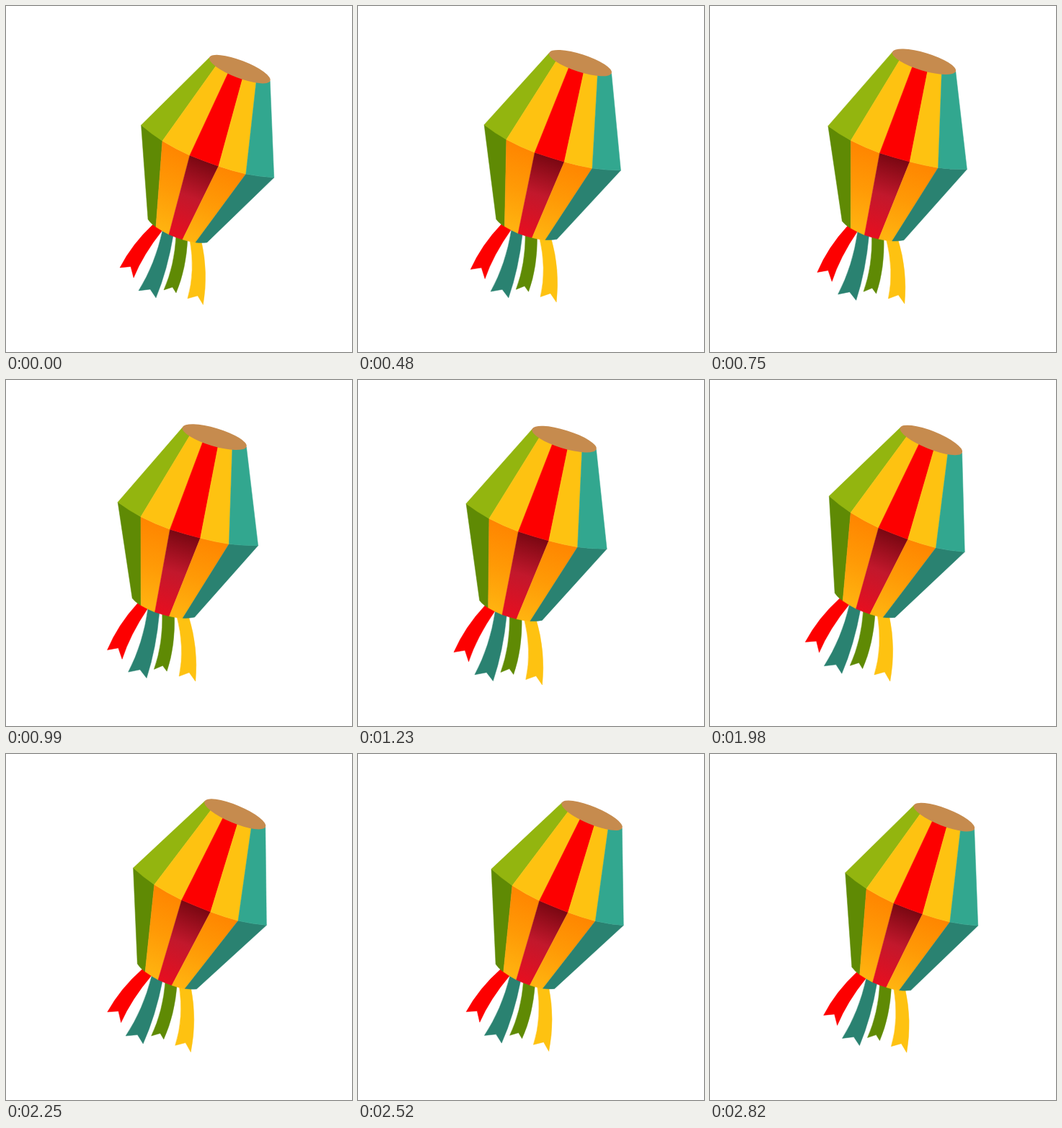
An HTML page without scripts for the animation above (2850 ms loop, 480 px wide and 480 px high).

```html
<!DOCTYPE html>
<html lang="en">
<head>
<meta charset="utf-8">
<title>Swinging paper lantern</title>
<style>
  html, body { margin: 0; width: 100%; height: 100%; overflow: hidden; background: #fff; }
  svg { display: block; width: 100%; height: 100%; }
  path { fill: var(--c); stroke: var(--c); stroke-width: .5; }

  /* Each part of the drift is a sine wave with its own phase */
  .bob, .swing { --sine: cubic-bezier(.364, 0, .636, 1); transform-origin: 0 0; }
  .bob { animation: bob 2850ms var(--sine) -2730ms infinite; }
  .swing {
    animation:
      drift 1425ms var(--sine) -47ms infinite alternate,
      tilt 1425ms var(--sine) -507ms infinite alternate,
      grow 1425ms var(--sine) -2810ms infinite alternate;
  }
  @keyframes bob {
    0%, 100% { translate: 0 202px; }
    16.14% { translate: 0 195.7px; }
    46.67% { translate: 0 204.2px; }
    76.84% { translate: 0 197.7px; }
  }
  @keyframes drift { from { translate: 279.5px 0; } to { translate: 246.5px 0; } }
  @keyframes tilt { from { rotate: 1.75deg; } to { rotate: -4.45deg; } }
  @keyframes grow { from { scale: .9985; } to { scale: 1.0355; } }

  .lime { --c: #93b50f; }
  .green { --c: #5f8a04; }
  .yellow { --c: #fec211; }
  .red { --c: #fd0000; }
  .mint { --c: #32a78f; }
  .teal { --c: #2a8271; }
  .amber { --c: url(#amber); }
  .wine { --c: url(#wine); }
</style>
</head>
<body>
<svg viewBox="0 0 480 480">
  <defs>
    <linearGradient id="amber" gradientUnits="userSpaceOnUse" x1="278" y1="211" x2="237" y2="320">
      <stop offset="0" stop-color="#ff8500"/>
      <stop offset=".5" stop-color="#ff9a06"/>
      <stop offset="1" stop-color="#ffb410"/>
    </linearGradient>
    <linearGradient id="wine" gradientUnits="userSpaceOnUse" x1="278" y1="211" x2="237" y2="320">
      <stop offset="0" stop-color="#740610"/>
      <stop offset=".5" stop-color="#c2182c"/>
      <stop offset="1" stop-color="#e60f20"/>
    </linearGradient>
  </defs>
  <g class="bob"><g class="swing"><g transform="translate(-279.5 -201.5)">
    <!-- ribbons -->
    <path class="red" d="M204 303Q175 330 158 363L173 361.5L177 377Q190 345 217 311Z"/>
    <path class="teal" d="M217 312Q207 358 184 395L200 393L208 405Q224 366 232 318Z"/>
    <path class="green" d="M236 318Q234 360 219 394L231 390L236 398Q250 365 252 322Z"/>
    <path class="yellow" d="M255 324Q263 368 252 406L266 402L273.500 414.500Q281 370 271 326Z"/>
    <!-- lower panels -->
    <path class="green" d="M187.500 165L217 187L208 306.500Q201 302 197 296Z"/>
    <path class="amber" d="M217 187Q235 198 255 207L226 317Q216 312 208 306.500Z"/>
    <path class="wine" d="M255 207Q275 215 295 222L245 324Q235 321 226 317Z"/>
    <path class="amber" d="M295 222Q314 228.500 333 233L263 328Q254 327 245 324Z"/>
    <path class="teal" d="M333 233Q353 237 372 238L279 328Q271 329 263 328Z"/>
    <!-- upper panels -->
    <path class="lime" d="M282.500 71L292 82L217 187Q201 177 187.500 165Z"/>
    <path class="yellow" d="M292 82L309 91L255 207Q235 198 217 187Z"/>
    <path class="red" d="M309 91L329 98L295 222Q275 215 255 207Z"/>
    <path class="yellow" d="M329 98L347.500 103L333 233Q314 228.500 295 222Z"/>
    <path class="mint" d="M347.500 103L366.500 104L372 238Q353 237 333 233Z"/>
    <ellipse cx="324.500" cy="87.300" rx="45.200" ry="12.200" transform="rotate(21 324.500 87.300)" fill="#c68b4e"/>
  </g></g></g>
</svg>
</body>
</html>
```
